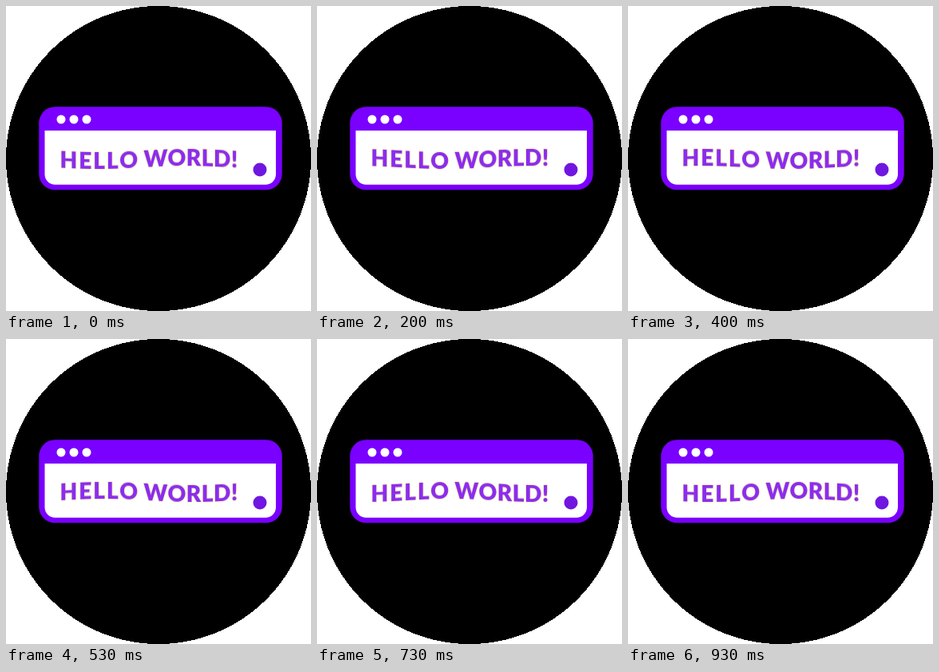
Recreate the animation shown at these times as an HTML page with a canvas. Size 382x382 px, loop 990 ms.

```html
<!DOCTYPE html>
<html lang="en">
<head>
<meta charset="utf-8">
<title>Hello World</title>
<style>
html, body { margin: 0; width: 100%; height: 100%; overflow: hidden; background: #fff; }
canvas { display: block; }
</style>
</head>
<body>
<canvas id="stage" width="382" height="382"></canvas>
<script>
const SIZE = 382, LOOP = 990, FPS = 15, STEPS = 15;
const PURPLE = '#7a00ff';
const ctx = document.getElementById('stage').getContext('2d');

const WAVE = { length: 220, height: 2, start: 115 };
const TEXT = { left: 62, right: 298, top: 170, height: 46, baseline: 202 };

function makeText() {
  const layer = document.createElement('canvas');
  layer.width = SIZE;
  layer.height = TEXT.height;
  const c = layer.getContext('2d');
  c.font = '900 28px Lato, Inter, sans-serif';
  c.lineJoin = 'round';
  c.lineWidth = 1.6;
  c.strokeStyle = 'rgba(245, 222, 150, 0.7)';
  c.fillStyle = '#8b2cf0';
  const y = TEXT.baseline - TEXT.top;
  for (const [word, x, spacing] of [['HELLO', 67.5, 2], ['WORLD!', 172.5, 0.6]]) {
    c.letterSpacing = spacing + 'px';
    c.strokeText(word, x, y);
    c.fillText(word, x, y);
  }
  return layer;
}

function circle(x, y, r, color) {
  ctx.fillStyle = color;
  ctx.beginPath();
  ctx.arc(x, y, r, 0, Math.PI * 2);
  ctx.fill();
}

// A disc with hard pixel edges, filled row by row.
function drawDisc() {
  const r = SIZE / 2;
  ctx.fillStyle = '#000';
  for (let y = 0; y < SIZE; y++) {
    const half = Math.round(Math.sqrt(r * r - (y + 0.5 - r) ** 2));
    ctx.fillRect(r - half, y, half * 2, 1);
  }
}

function box(x, y, w, h, radii, color) {
  ctx.fillStyle = color;
  ctx.beginPath();
  ctx.roundRect(x, y, w, h, radii);
  ctx.fill();
}

function drawWindow() {
  box(41.3, 126.3, 304.4, 104, 20, PURPLE);
  box(48.5, 156, 289.5, 67.8, [0, 0, 13, 13], '#fff');
  for (let i = 0; i < 3; i++) circle(69 + 16 * i, 142, 5.5, '#fff');
  circle(318, 205, 8.5, '#7016e0');
}

// Shift each pixel column along a wave travelling to the right.
function drawWavyText(layer, progress) {
  const trough = WAVE.start + WAVE.length * progress;
  for (let x = TEXT.left; x < TEXT.right; x++) {
    const dy = WAVE.height * Math.cos((x - trough) / WAVE.length * Math.PI * 2);
    ctx.drawImage(layer, x, 0, 1, TEXT.height, x, TEXT.top + dy, 1, TEXT.height);
  }
}

// Step times fall on 15 fps, rounded to 10 ms.
function stepAt(time) {
  let step = 0;
  while (step < STEPS - 1 && Math.round((step + 1) * 100 / FPS) * 10 <= time) step++;
  return step;
}

const text = makeText();
const startTime = performance.now();

function draw(now) {
  const step = stepAt(Math.max(0, now - startTime) % LOOP);
  ctx.fillStyle = '#fff';
  ctx.fillRect(0, 0, SIZE, SIZE);
  drawDisc();
  drawWindow();
  drawWavyText(text, step / STEPS);
  requestAnimationFrame(draw);
}

draw(startTime);
</script>
</body>
</html>
```
